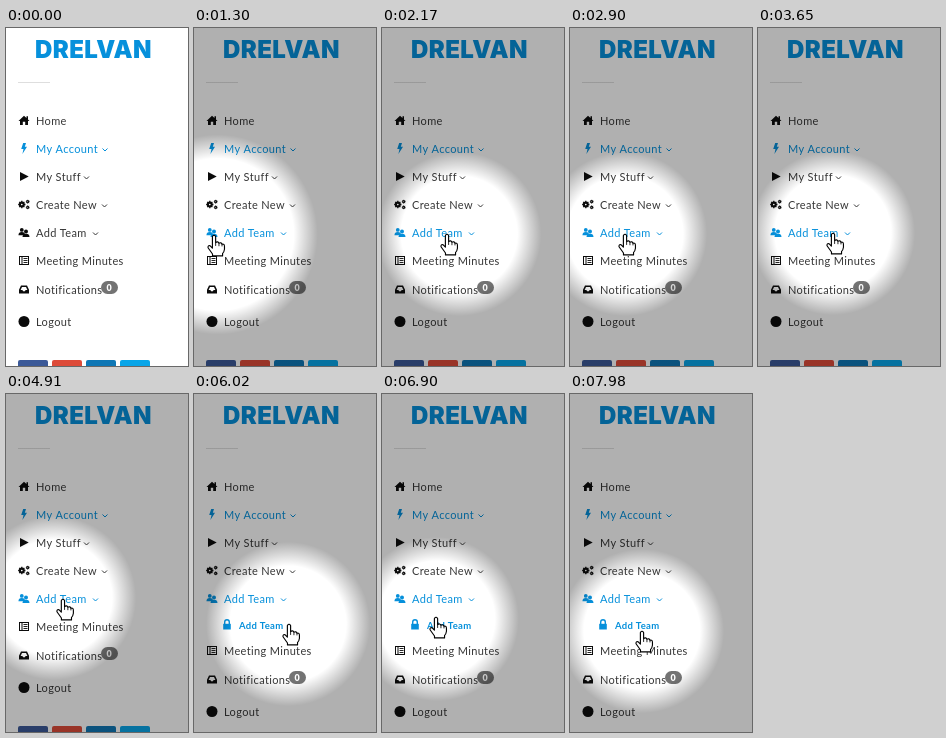
An HTML page with a canvas that plays this animation: 182 px wide and 338 px high, repeating every 8000 ms.

```html
<!DOCTYPE html>
<html lang="en">
<head>
<meta charset="utf-8">
<title>Menu spotlight</title>
<style>
html, body { margin: 0; width: 182px; height: 338px; overflow: hidden; background: #fff; }
canvas { display: block; width: 182px; height: 338px; }
</style>
</head>
<body>
<canvas id="stage"></canvas>
<script>
const W = 182, H = 338, LOOP = 8000;
const BLUE = '#0690db', INK = '#363636', BLACK = '#0b0b0b';
const LIGHT_LEAD = 130;
const canvas = document.getElementById('stage');
const ctx = canvas.getContext('2d');
const dpr = window.devicePixelRatio || 1;
canvas.width = W * dpr;
canvas.height = H * dpr;

const clamp = v => Math.max(0, Math.min(1, v));
const lerp = (a, b, p) => a + (b - a) * p;
const ramp = (t, from, to) => clamp((t - from) / (to - from));
const easeOut = p => 1 - (1 - p) ** 2;

// Pointer tip: time, x, y
const pointerKeys = [
  [720, -24, 198], [1300, 20, 207], [1580, 28, 206], [1800, 30, 206],
  [2330, 80, 206], [2560, 74, 206], [2900, 55, 206], [3120, 55, 206],
  [3650, 75, 205], [4070, 75, 205], [4600, 66, 205], [4910, 57, 205],
  [5040, 48, 204], [5150, 52, 204], [5440, 57, 206], [5800, 84, 225],
  [6020, 95, 230], [6160, 94, 230], [6450, 56, 216], [6900, 54, 223],
  [7220, 56, 228], [7600, 66, 234], [7980, 72, 237]
];

function pointerAt(t) {
  const next = pointerKeys.findIndex(k => k[0] > t);
  if (next < 0) return pointerKeys[pointerKeys.length - 1].slice(1);
  if (next === 0) return pointerKeys[0].slice(1);
  const a = pointerKeys[next - 1], b = pointerKeys[next];
  const p = ramp(t, a[0], b[0]);
  return [lerp(a[1], b[1], p), lerp(a[2], b[2], p)];
}

const hand = new Path2D('M-1.7 1.6Q0-1 1.7 1.6V8Q4 6.3 5.2 8.6Q7.4 7.4 8.4 9.7Q11 9 11 12V15Q10.6 18 9 19.4V22H-1.6V20Q-4 16.6-6.3 13.4Q-6.6 10.6-4 11.4L-1.7 13.8Z');
const knuckles = new Path2D('M1.7 8V11.5M5.2 8.6V11.8M8.4 9.7V12');

const shapes = {
  home: new Path2D('M-5.5 .5L0-4.8 2.5-2.4V-4.3H4V-1L5.5 .5H4V4.5H1.2V1.2H-1.2V4.5H-4V.5Z'),
  bolt: new Path2D('M-.8-5.5H2L.8-1.8H3L-1.6 5.5-.5 .4H-2.8Z'),
  play: new Path2D('M-4-4.5L4.7 0-4 4.5Z'),
  lock: new Path2D('M-3.8-.7H3.8V5H-3.8Z'),
  shackle: new Path2D('M-2.3-.5V-2.4A2.3 2.3 0 0 1 2.3-2.4V-.5'),
  tray: new Path2D('M-3-4H3L5 .2V4H-5V.2ZM-2-2.6L-3.4 .4H-1.6L-.9 1.8H.9L1.6 .4H3.4L2-2.6Z')
};

function disc(x, y, r) {
  ctx.beginPath();
  ctx.arc(x, y, r, 0, Math.PI * 2);
  ctx.fill();
}

function gear(x, y, r) {
  ctx.lineWidth = r * 0.75;
  ctx.beginPath();
  ctx.arc(x, y, r * 0.68, 0, Math.PI * 2);
  ctx.stroke();
  ctx.lineWidth = r * 0.45;
  ctx.beginPath();
  for (let i = 0; i < 8; i++) {
    const c = Math.cos(i * Math.PI / 4), s = Math.sin(i * Math.PI / 4);
    ctx.moveTo(x + c * r * 0.8, y + s * r * 0.8);
    ctx.lineTo(x + c * r * 1.3, y + s * r * 1.3);
  }
  ctx.stroke();
}

function person(x, y, s) {
  disc(x, y - 2 * s, 2.1 * s);
  ctx.beginPath();
  ctx.ellipse(x, y + 4 * s, 3.7 * s, 3.6 * s, 0, Math.PI, 0);
  ctx.fill();
}

const icons = {
  home: () => ctx.fill(shapes.home),
  bolt: () => ctx.fill(shapes.bolt),
  play: () => ctx.fill(shapes.play),
  gears() {
    gear(-2.2, 0, 2.8);
    gear(3.7, -2.8, 1.5);
    gear(3.7, 2.8, 1.5);
  },
  team() {
    person(-2.2, -0.8, 0.9);
    person(2, 0.8, 0.95);
  },
  paper() {
    ctx.lineWidth = 1;
    ctx.strokeRect(-4.5, -4, 9, 8);
    ctx.fillRect(-2.5, -4, 1, 8);
    for (const y of [-2.4, -0.4, 1.6]) ctx.fillRect(-0.5, y, 4, 0.9);
  },
  tray: () => ctx.fill(shapes.tray, 'evenodd'),
  dot: () => disc(0, 0, 5.5),
  lock() {
    ctx.lineWidth = 1.4;
    ctx.fill(shapes.lock);
    ctx.stroke(shapes.shackle);
  }
};

function icon(name, x, y, color) {
  ctx.save();
  ctx.translate(x, y);
  ctx.fillStyle = ctx.strokeStyle = color;
  icons[name]();
  ctx.restore();
}

function label(str, x, y, font, color, gap = 0) {
  ctx.font = font;
  ctx.letterSpacing = gap + 'px';
  ctx.fillStyle = color;
  ctx.fillText(str, x, y);
}

function chevron(x, y, color) {
  ctx.strokeStyle = color;
  ctx.lineWidth = 1;
  ctx.beginPath();
  ctx.moveTo(x - 2.5, y - 1);
  ctx.lineTo(x, y + 1.5);
  ctx.lineTo(x + 2.5, y - 1);
  ctx.stroke();
}

// Icon, text, middle line, chevron x
const items = [
  ['home', 'Home', 93],
  ['bolt', 'My Account', 121, 99],
  ['play', 'My Stuff', 149, 80.5],
  ['gears', 'Create New', 177, 98.5],
  ['team', 'Add Team', 205, 89.5],
  ['paper', 'Meeting Minutes', 233],
  ['tray', 'Notifications', 262],
  ['dot', 'Logout', 294]
];

function menu(t, open) {
  const hover = t >= 1150;
  for (const [name, text, mid, arrow] of items) {
    const y = mid + (mid > 210 ? open : 0);
    const lit = name === 'bolt' || (name === 'team' && hover);
    const color = lit ? BLUE : INK;
    icon(name, 18, y - 0.5, lit ? BLUE : BLACK);
    label(text, 30, y + 4, '11px Lato, sans-serif', color, 0.35);
    if (arrow) chevron(arrow, y + 0.5, color);
    if (name === 'tray') badge(y - 2.5);
  }
  if (open > 0) {
    ctx.save();
    ctx.beginPath();
    ctx.rect(0, 216, W, open + 2);
    ctx.clip();
    icon('lock', 33, 230.5, BLUE);
    label('Add Team', 45, 235, 'bold 9.5px Lato, sans-serif', BLUE, 0.3);
    ctx.restore();
  }
}

function badge(y) {
  ctx.fillStyle = '#737373';
  ctx.beginPath();
  ctx.roundRect(95, y - 6.5, 17, 13, 6.5);
  ctx.fill();
  label('0', 100.6, y + 3.3, '900 9px Lato, sans-serif', '#fff');
}

function socialBar(top) {
  ['#3b5998', '#dd4b39', '#0f77b5', '#08a5e8'].forEach((color, i) => {
    ctx.fillStyle = color;
    ctx.beginPath();
    ctx.roundRect(12 + i * 34, top, 30, 20, 2);
    ctx.fill();
  });
}

function spotlight(t) {
  const [x, y] = pointerAt(t + LIGHT_LEAD);
  const r = lerp(130, 70, ramp(t, 600, 1600));
  const shade = 0.31 * easeOut(ramp(t, 600, 1350));
  const g = ctx.createRadialGradient(x, y, r - 12, x, y, r + 12);
  g.addColorStop(0, 'rgba(0,0,0,0)');
  g.addColorStop(1, `rgba(0,0,0,${shade})`);
  ctx.fillStyle = g;
  ctx.fillRect(0, 0, W, H);
}

function pointer(t) {
  ctx.save();
  ctx.translate(...pointerAt(t));
  ctx.scale(0.95, 0.95);
  ctx.lineJoin = 'round';
  ctx.fillStyle = '#fff';
  ctx.strokeStyle = '#000';
  ctx.lineWidth = 1.2;
  ctx.fill(hand);
  ctx.stroke(hand);
  ctx.lineWidth = 0.9;
  ctx.stroke(knuckles);
  ctx.restore();
}

function draw(t) {
  const open = 24 * easeOut(ramp(t, 5400, 5780));
  ctx.setTransform(dpr, 0, 0, dpr, 0, 0);
  ctx.fillStyle = '#fff';
  ctx.fillRect(0, 0, W, H);
  label('DRELVAN', 29, 30, '900 24px Inter, sans-serif', BLUE, 0.4);
  ctx.fillStyle = '#dedede';
  ctx.fillRect(12, 54, 32, 1);
  menu(t, open);
  socialBar(332 + open);
  if (t >= 720) {
    spotlight(t);
    pointer(t);
  }
}

const start = performance.now();
function tick() {
  draw((performance.now() - start) % LOOP);
  requestAnimationFrame(tick);
}
tick();
</script>
</body>
</html>
```
